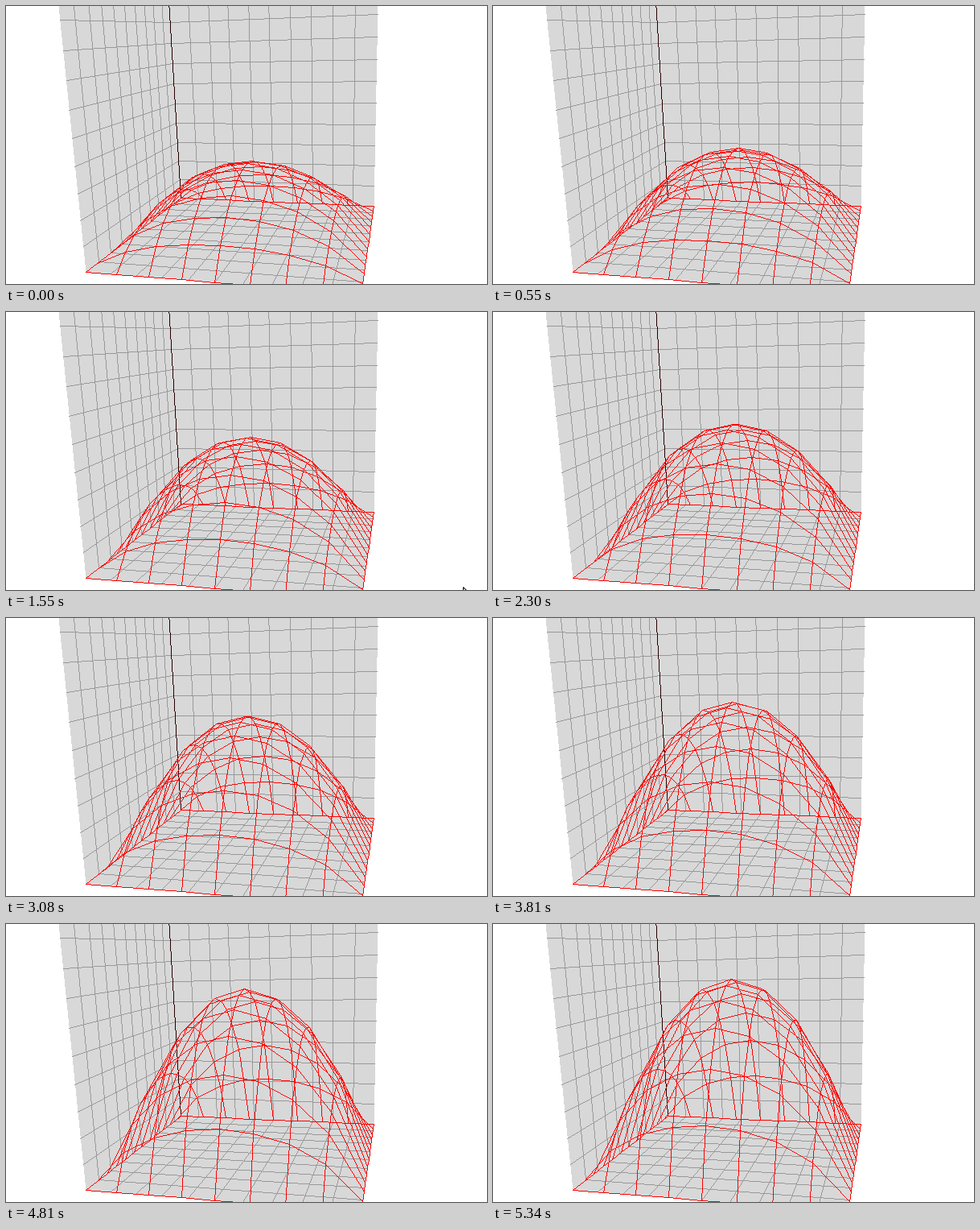
Write a matplotlib script that moves like this. It is 598 by 345 pixels and loops after 5410 ms.

```python
import numpy as np
import matplotlib.pyplot as plt
from matplotlib.animation import FuncAnimation
from matplotlib.patches import Polygon
from matplotlib.path import Path

W, H, DPI = 598, 345, 100
LOOP, STEP = 5410, 10
TICK = 6.68             # animation frames per screen refresh
RISES = 22              # load steps in one loop
PERIOD = 3.77           # refreshes per load step
WHITE, PANE, GRID = (255, 255, 255), (216, 216, 216), (153, 153, 153)
AXIS, RED = (40, 0, 0), (255, 0, 0)

# Homogeneous image vectors of the box: near-left corner and its three axes
ORIGIN = np.array([99.0, 330.0, 1.0])
AXES = np.array([[290.8, -14.4, -0.116],
                 [211.9, 11.0, 0.4327],
                 [-43.07, -349.63, -0.10848]])


def project(x, y, z):
    """Box coordinates in 0..1 to pixel positions."""
    pts = np.stack(np.broadcast_arrays(x, y, z), axis=-1).astype(float)
    q = ORIGIN + pts @ AXES
    return q[..., :2] / q[..., 2:]


def membrane(x, y):
    """Solution of the Poisson equation on the unit square, peak 1."""
    def raw(x, y):
        s = x * (1 - x) / 2
        for n in range(1, 30, 2):
            c = np.cosh(n * np.pi * (y - 0.5)) / np.cosh(n * np.pi / 2)
            s = s - 4 / (n * np.pi) ** 3 * np.sin(n * np.pi * x) * c
        return s
    return raw(x, y) / raw(0.5, 0.5)


def draw_line(img, points, color):
    """One-pixel polyline without smoothing."""
    points = np.rint(points)
    for a, b in zip(points[:-1], points[1:]):
        n = int(np.abs(b - a).max()) + 1
        x, y = np.rint(np.linspace(a, b, n)).astype(int).T
        ok = (x >= 0) & (x < W) & (y >= 0) & (y < H)
        img[y[ok], x[ok]] = color


def draw_box():
    img = np.full((H, W, 3), WHITE, dtype=np.uint8)
    pixels = np.indices((H, W))[::-1].reshape(2, -1).T
    faces = (lambda a, b: (a, b, 0), lambda a, b: (0, a, b), lambda a, b: (a, 1, b))
    for face in faces:
        corners = [project(*face(a, b)) for a, b in ((0, 0), (1, 0), (1, 1), (0, 1))]
        img[Path(corners).contains_points(pixels).reshape(H, W)] = PANE
    for face in faces:
        for t in np.arange(1, 10) / 10:
            draw_line(img, [project(*face(t, 0)), project(*face(t, 1))], GRID)
            draw_line(img, [project(*face(0, t)), project(*face(1, t))], GRID)
    draw_line(img, [project(0, 1, 0), project(0, 1, 1)], AXIS)
    return img


U, V = np.meshgrid(np.linspace(0, 1, 9), np.linspace(0, 1, 13))
SHAPE = membrane(U, V)
BOX = draw_box()


def draw_scene(rises):
    img = BOX.copy()
    pts = project(U, V, (0.311 + 0.01895 * rises) * SHAPE)
    for line in [*pts, *pts.swapaxes(0, 1)]:
        draw_line(img, line, RED)
    return img


scenes = [draw_scene(k) for k in range(RISES + 1)]
rise_ticks = np.maximum(1, np.floor(0.85 + PERIOD * np.arange(RISES)))
rise_frames = np.rint(rise_ticks * TICK)

fig = plt.figure(figsize=(W / DPI, H / DPI), dpi=DPI, facecolor="white")
ax = fig.add_axes([0, 0, 1, 1])
ax.axis("off")
view = ax.imshow(scenes[0], extent=(0, W, H, 0), aspect="auto",
                 interpolation="nearest")
ARROW = np.array([(0, 0), (0, 16), (11, 11)])
pointer = ax.add_patch(Polygon(ARROW, facecolor="white", edgecolor="black",
                               linewidth=0.72))
ax.set_xlim(0, W)
ax.set_ylim(H, 0)


def draw(i):
    view.set_data(scenes[np.searchsorted(rise_frames, i, side="right")])

    # The pointer peeks in at the bottom edge, then slides right
    tick = int(i / TICK)
    pointer.set_visible(20 <= tick < 31)
    pointer.set_xy(ARROW + (568.5 + 2.5 * max(0, tick - 27), 341.5))
    return view, pointer


anim = FuncAnimation(fig, draw, frames=LOOP // STEP, interval=STEP,
                     repeat=True, repeat_delay=0, blit=False)
plt.show()
```
